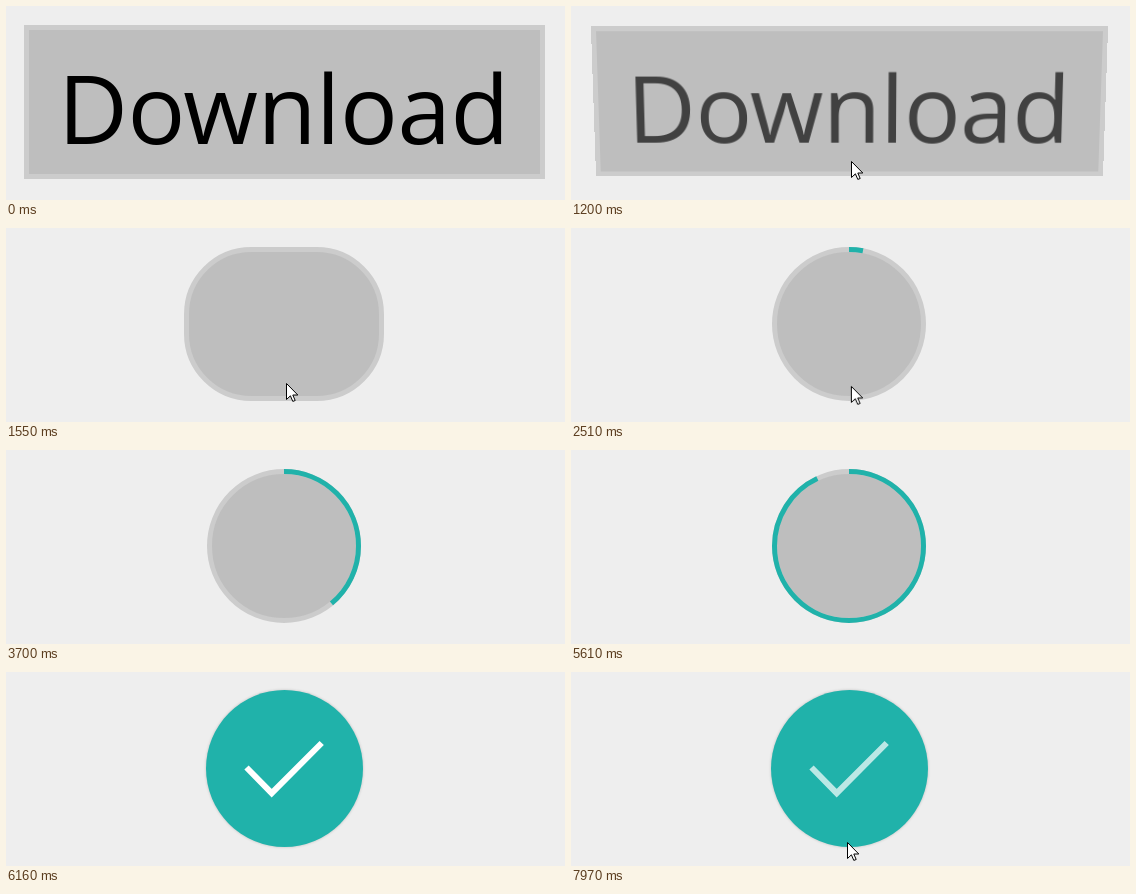
Recreate the animation shown at these times as an HTML page. Size 559 by 194 pixels, loop 7.99 s.

```html
<!DOCTYPE html>
<html lang="en">
<head>
<meta charset="utf-8">
<title>Download button</title>
<style>
  :root { --loop: 7990ms linear infinite; --teal: #20b2aa; }
  html, body { margin: 0; width: 100%; height: 100%; overflow: hidden; background: #eee; }
  .stage { position: relative; width: 559px; height: 194px; overflow: hidden; }
  .stage > *, .press > * { position: absolute; box-sizing: border-box; }

  .press { left: 18px; top: 19px; width: 521px; height: 154px; animation: press var(--loop); }
  .box {
    left: 0; top: 0; width: 521px; height: 154px;
    background: #bebebe; border: 5px solid #ccc;
    animation: shrink var(--loop);
  }
  .label {
    left: 34px; top: 4.5px;
    font: 96px/154px "Open Sans", "Noto Sans", sans-serif;
    letter-spacing: -.4px; white-space: nowrap; color: #000;
    animation: label var(--loop);
  }

  svg { left: 0; top: 0; overflow: visible; }
  .ring {
    fill: none; stroke: var(--teal); stroke-width: 5; stroke-dasharray: 0 300;
    animation: progress var(--loop);
  }
  .done {
    left: 199.5px; top: 17.5px; width: 157px; height: 157px; border-radius: 50%;
    background: var(--teal); box-shadow: 0 0 3px rgba(0, 0, 0, .2);
    animation: done var(--loop);
  }
  .check { fill: none; stroke: #fff; stroke-width: 6; animation: check var(--loop); }
  .cursor { animation: cursor var(--loop); }

  @keyframes press {
    0%, 15% { transform: none; animation-timing-function: step-start; }
    15.01%, 15.64% { transform: perspective(1000px) translateZ(-17.5px) rotateX(-7.6deg); }
    17%, 100% { transform: perspective(1000px) translateZ(0) rotateX(0deg); }
  }
  @keyframes shrink {
    0%, 15.64% { left: 0; width: 521px; border-radius: 0; animation-timing-function: ease; }
    22.1%, 100% { left: 183px; width: 154px; border-radius: 77px; }
  }
  @keyframes label {
    0%, 8.7% { opacity: 1; }
    11.8%, 15.64% { opacity: .66; }
    17.4%, 100% { opacity: 0; }
  }
  @keyframes progress {
    0% { stroke-dasharray: 0 300; }
    28.98% { stroke-dasharray: 0 300; animation-timing-function: steps(34, end); }
    74.13%, 100% { stroke-dasharray: 102 300; }
  }
  @keyframes done {
    0%, 74% { opacity: 0; transform: scale(.98); animation-timing-function: ease; }
    77.05%, 100% { opacity: 1; transform: none; }
  }
  @keyframes check {
    0%, 74% { opacity: 0; animation-timing-function: ease; }
    77.05%, 98.2% { opacity: 1; }
    99.7%, 100% { opacity: .7; }
  }
  @keyframes cursor {
    0%, 7.9% { transform: translate(280px, 196px); animation-timing-function: ease-out; }
    11.85%, 28.2% { transform: translate(280px, 155px); animation-timing-function: ease-in; }
    38.05% { transform: translate(279px, 174px); }
    39.1% { transform: translate(279px, 196px); }
    97.4% { transform: translate(276px, 196px); }
    99.7%, 100% { transform: translate(276px, 170px); }
  }
</style>
</head>
<body>
<div class="stage">
  <div class="press">
    <div class="box"></div>
    <div class="label">Download</div>
  </div>
  <svg width="559" height="194">
    <circle class="ring" cx="278" cy="96" r="74.5" pathLength="100" transform="rotate(-90 278 96)"/>
  </svg>
  <div class="done"></div>
  <svg width="559" height="194">
    <path class="check" d="M240.5 95.5 265.7 121.2 315.7 71"/>
    <path class="cursor" d="M.5.5V16.5L4.4 12.8 6.8 18.4 9.2 17.5 6.8 12H11.8Z" fill="#fff" stroke="#000"/>
  </svg>
</div>
</body>
</html>
```
